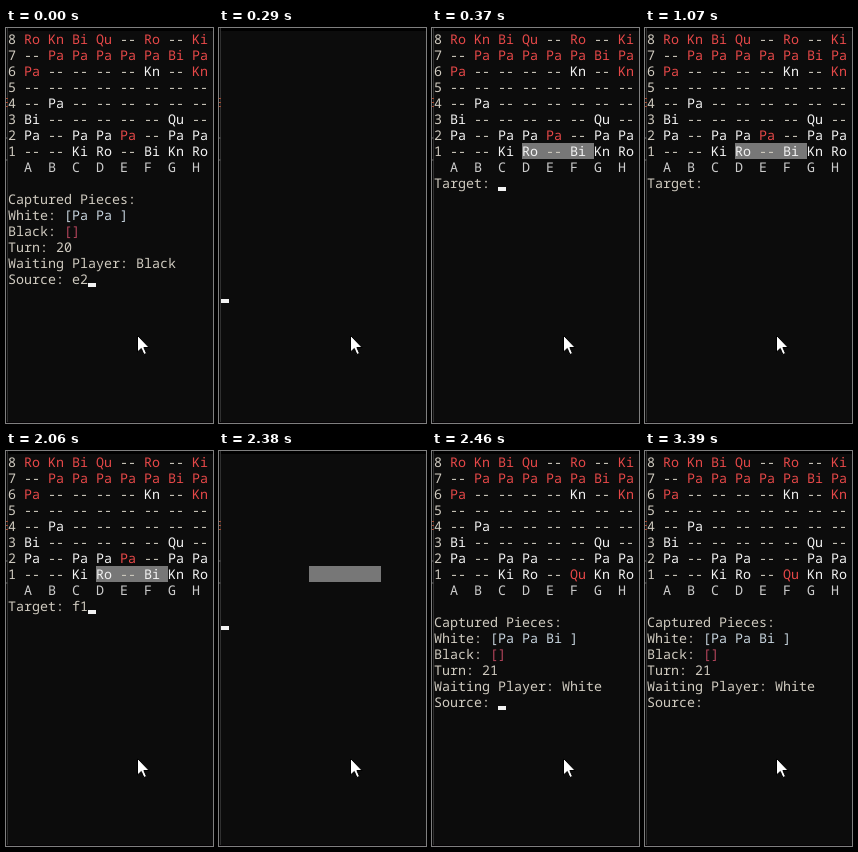
An HTML page that plays this animation: 207x395 px, repeating every 3.48 s.

```html
<!DOCTYPE html>
<html lang="en">
<head>
<meta charset="utf-8">
<title>Terminal chess</title>
<style>
  html, body { margin: 0; width: 100%; height: 100%; overflow: hidden; background: #0c0c0c; }
  svg { display: block; width: 207px; height: 395px; }
  text { font: 13.333px "Noto Sans Mono", "DejaVu Sans Mono", monospace; white-space: pre; text-rendering: geometricPrecision; }
</style>
</head>
<body>
<svg viewBox="0 0 207 395" shape-rendering="crispEdges">
  <rect width="207" height="395" fill="#0c0c0c"/>
  <rect width="207" height="3" fill="#000"/>
  <rect width="1" height="395" fill="#050505"/>
  <rect x="1" width="1" height="395" fill="#303030"/>
  <path d="M0 70h2v1h-2zM0 74h2v1h-2zM0 78h2v1h-2z" fill="#a34a30"/>
  <path d="M0 109h2v2h-2zM0 131h2v2h-2z" fill="#3c3c3c"/>
  <rect y="394" width="207" height="1" fill="#050205"/>
  <rect id="selection" x="90" y="115" width="72" height="16" fill="#777"/>
  <g id="screen"></g>
  <rect id="caret" width="8" height="4" fill="#f2f2f2"/>
  <path d="M131.5 307.5v16.5l3.8-3.5 2.6 6 2.6-1.1-2.6-5.9h5.2z" fill="#fff" stroke="#000" shape-rendering="auto"/>
</svg>
<script>
const LOOP = 3480, CELL = 8, LINE = 16, LEFT = 2, TOP = 3;
const COLOR = { text: '#d0cbc0', letter: '#cccccc', white: '#f2f2f2', black: '#e54848', list: '#c5d2dc', empty: '#b4455c' };
const $ = id => document.getElementById(id);

// Capitalised pieces are white, lowercase ones black.
const before = [
  'ro kn bi qu -- ro -- ki',
  '-- pa pa pa pa pa bi pa',
  'pa -- -- -- -- Kn -- kn',
  '-- -- -- -- -- -- -- --',
  '-- Pa -- -- -- -- -- --',
  'Bi -- -- -- -- -- Qu --',
  'Pa -- Pa Pa pa -- Pa Pa',
  '-- -- Ki Ro -- Bi Kn Ro'
];
const after = [...before.slice(0, 6), 'Pa -- Pa Pa -- -- Pa Pa', '-- -- Ki Ro -- qu Kn Ro'];

const put = (col, row, str, color = COLOR.text) =>
  `<text x="${LEFT + col * CELL}" y="${TOP + row * LINE + 13}" fill="${color}">${str}</text>`;

function piece(name, col, row) {
  if (name === '--') return put(col, row, name);
  const isWhite = name[0] < 'a';
  return put(col, row, name[0].toUpperCase() + name[1], isWhite ? COLOR.white : COLOR.black);
}

function board(ranks) {
  const rows = ranks.map((rank, row) => put(0, row, 8 - row) +
    rank.split(' ').map((name, i) => piece(name, 2 + 3 * i, row)).join(''));
  const files = [...'ABCDEFGH'].map((c, i) => put(2 + 3 * i, 8, c, COLOR.letter));
  return rows.join('') + files.join('');
}

const status = (captured, turn, waiting) =>
  put(0, 10, 'Captured Pieces:') +
  put(0, 11, 'White:') + put(7, 11, `[${captured} ]`, COLOR.list) +
  put(0, 12, 'Black:') + put(7, 12, '[]', COLOR.empty) +
  put(0, 13, `Turn: ${turn}`) +
  put(0, 14, `Waiting Player: ${waiting}`);

const source = board(before) + status('Pa Pa', 20, 'Black') + put(0, 15, 'Source: e2');
const target = typed => board(before) + put(0, 9, 'Target: ' + typed);
const moved = board(after) + status('Pa Pa Bi', 21, 'White') + put(0, 15, 'Source:');

// Each step: start time, screen content, caret cell (null while blinked off).
const steps = [
  [0, source, [10, 15]],
  [290, '', [0, 16]],
  [370, target(''), [8, 9]],
  [1070, target(''), null],
  [1540, target(''), [8, 9]],
  [2000, target('f'), [9, 9]],
  [2060, target('f1'), [10, 9]],
  [2380, '', [0, 10]],
  [2460, moved, [8, 15]],
  [3390, moved, null]
];

let shown = null;
function render(time) {
  const step = steps.findLast(([start]) => start <= time);
  if (step === shown) return;
  shown = step;
  const [start, content, caret] = step;
  $('screen').innerHTML = content;
  $('selection').style.display = start >= 370 && start < 2460 ? '' : 'none';
  $('caret').style.display = caret ? '' : 'none';
  if (caret) {
    $('caret').setAttribute('x', LEFT + caret[0] * CELL);
    $('caret').setAttribute('y', TOP + caret[1] * LINE + 12);
  }
}

const origin = performance.now();
function tick() {
  render((performance.now() - origin) % LOOP);
  requestAnimationFrame(tick);
}
tick();
</script>
</body>
</html>
```
